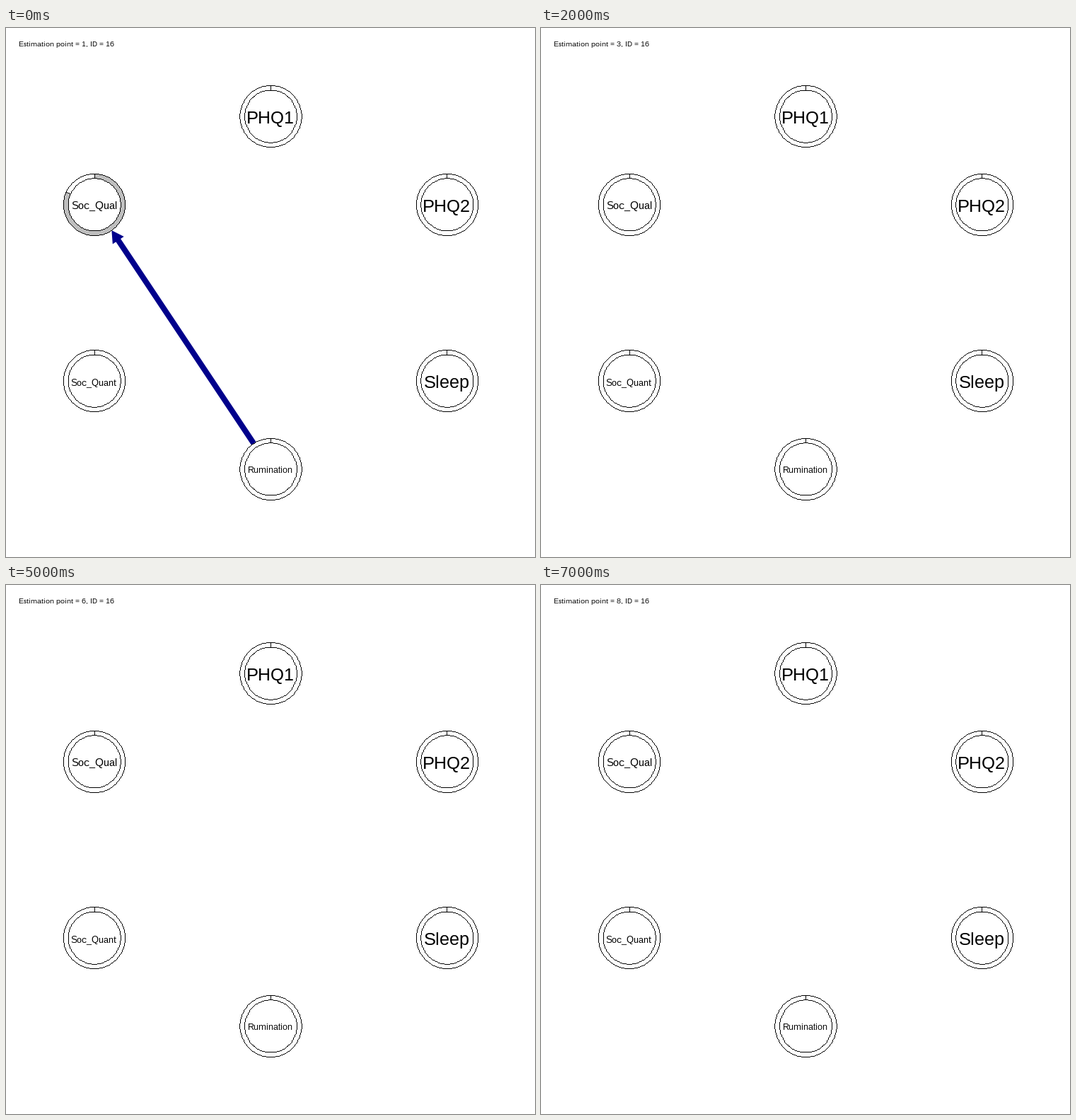
Animation, 748 px wide and 748 px high, one loop 8000 ms. Source, as a matplotlib script:

```python
import math

import numpy as np
import matplotlib.pyplot as plt
from matplotlib.animation import FuncAnimation
from matplotlib.collections import PolyCollection
from matplotlib.patches import Circle, Polygon, Wedge

plt.rcParams.update({
    "font.family": "Liberation Sans",
    "text.hinting": "native",
    "text.hinting_factor": 1,
})

SIZE = 748
DPI = 88
PX = 72 / DPI  # points per pixel
MID, FAR, NEAR = SIZE / 2, SIZE / 3, SIZE / 6
R_OUT, R_IN = 43.6, 37

# name: (x, y, label size in px)
NODES = {
    "PHQ1": (MID, MID - FAR, 25),
    "PHQ2": (MID + FAR, MID - NEAR, 25),
    "Sleep": (MID + FAR, MID + NEAR, 25),
    "Rumination": (MID, MID + FAR, 12),
    "Soc_Quant": (MID - FAR, MID + NEAR, 13),
    "Soc_Qual": (MID - FAR, MID - NEAR, 15),
}

BLUE, RED = "#00008b", "#ff0000"

# point: (edges as (from, to, colour, width, bend), ring fill per node)
STATES = {
    1: ([("Rumination", "Soc_Qual", BLUE, 8, 0)], {"Soc_Qual": 0.817}),
    4: ([("Rumination", "Soc_Qual", "#ff6262", 5.7, 0),
         ("Sleep", "Soc_Quant", "#ff5050", 6, -1),
         ("Soc_Quant", "Sleep", "#ff3232", 6.6, 1)],
        {"Soc_Qual": 0.185, "Soc_Quant": 0.174, "Sleep": 0.584}),
    5: ([("Rumination", "Soc_Qual", BLUE, 8, 0),
         ("Sleep", "Rumination", RED, 7.6, 0)],
        {"Soc_Qual": 0.25, "Rumination": 0.486}),
}

fig = plt.figure(figsize=(SIZE / DPI, SIZE / DPI), dpi=DPI, facecolor="white")
ax = fig.add_axes([0, 0, 1, 1])


def ring_points(x, y, r, turns):
    """Points on a circle; turns run clockwise from the top."""
    a = 2 * np.pi * np.asarray(turns)
    return np.column_stack([x + r * np.sin(a), y - r * np.cos(a)])


def trace(points):
    """Whole pixels along a polyline, one pixel thick."""
    points = np.rint(points)
    parts = [np.rint(np.linspace(a, b, int(abs(b - a).max()) + 1))
             for a, b in zip(points, points[1:])]
    return np.concatenate(parts)


def draw_pixels(pixels):
    corners = np.array([[-.5, -.5], [.5, -.5], [.5, .5], [-.5, .5]])
    squares = np.unique(pixels, axis=0)[:, None] + corners
    ax.add_collection(PolyCollection(squares, facecolors="black",
                                     linewidths=0, zorder=3),
                      autolim=False)


def rim_point(a, b, bend):
    """Where the edge from a to b meets the rim of a."""
    d = b - a
    if bend:
        turn = math.radians(17.4)
        d = np.array([math.copysign(math.cos(turn), d[0]),
                      bend * math.sin(turn)])
    return a + R_OUT * d / np.hypot(*d)


def draw_edge(src, dst, color, width, bend):
    a, b = (np.array(NODES[n][:2]) for n in (src, dst))
    start, tip = rim_point(a, b, bend), rim_point(b, a, bend)
    ctrl = (start + tip) / 2 + np.array([0, 59 * bend])

    head, half = 12 + 0.62 * width, 6.5 + 0.38 * width
    back = ctrl - tip
    back = back / np.hypot(*back)
    side = np.array([-back[1], back[0]])
    base = tip + head * back

    stop = 1 - 0.9 * head / np.hypot(*(tip - start))
    t = np.linspace(0, stop, 80)[:, None]
    curve = (1 - t) ** 2 * start + 2 * t * (1 - t) * ctrl + t ** 2 * tip
    ax.plot(curve[:, 0], curve[:, 1], color=color, lw=width * PX,
            solid_capstyle="butt", zorder=1)
    ax.add_patch(Polygon([tip, base + half * side, base - half * side],
                         fc=color, ec="none", zorder=1))


def draw_node(name, fill):
    x, y, size = NODES[name]
    ax.add_patch(Circle((x, y), R_OUT, fc="white", ec="none", zorder=2))
    if fill:
        ax.add_patch(Wedge((x, y), R_OUT, -90, -90 + 360 * fill,
                           width=R_OUT - R_IN, fc="#bebebe", ec="none",
                           zorder=2))
    turns = np.linspace(0, 1, 101)
    outline = [trace(ring_points(x, y, r, turns)) for r in (R_IN, R_OUT)]
    for turn in (0, fill):
        outline.append(trace([ring_points(x, y, r, [turn])[0]
                              for r in (R_IN, R_OUT)]))
    draw_pixels(np.concatenate(outline))
    ax.text(x - 0.8, y + 1 + 0.358 * size, name, fontsize=size * PX,
            ha="center", va="baseline", zorder=4)


def draw(i):
    ax.clear()
    ax.set_xlim(-0.5, SIZE - 0.5)  # whole numbers are pixel centres
    ax.set_ylim(SIZE - 0.5, -0.5)
    ax.axis("off")
    point = i + 1
    edges, fills = STATES.get(point, ([], {}))
    for edge in edges:
        draw_edge(*edge)
    for name in NODES:
        draw_node(name, fills.get(name, 0))
    ax.text(17.5, 26, f"Estimation point = {point}, ID = 16",
            fontsize=10 * PX, ha="left", va="baseline")


anim = FuncAnimation(fig, draw, frames=8, init_func=lambda: None,
                     interval=1000, repeat=True, repeat_delay=0)
plt.show()
```
